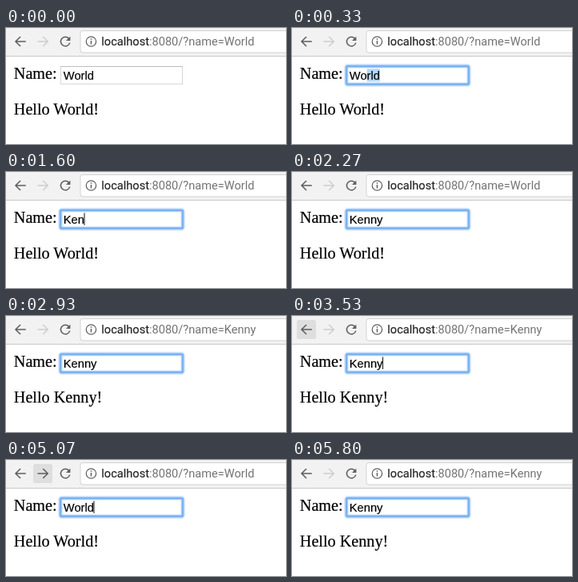
These frames come from a looping animation (350x146 px, 5.94 s). An HTML page:

```html
<!DOCTYPE html>
<html lang="en">
<head>
<meta charset="utf-8">
<title>Name form</title>
<style>
  html, body { margin: 0; width: 100%; height: 100%; overflow: hidden; background: #fff; }
  svg { display: block; width: 100%; height: 100%; }
  text { white-space: pre; }
  .serif { font: 20.2px "Liberation Serif", "Times New Roman", serif; stroke: #000; stroke-width: 0.2; }
  .field { font: 14.7px "Liberation Sans", Arial, sans-serif; stroke: #000; stroke-width: 0.2; }
  .url { font: 14.6px Roboto, sans-serif; fill: #737373; }
  .host { fill: #222; stroke: #222; stroke-width: 0.15; }
  .icon { fill: none; stroke: #5e5e5e; stroke-width: 1.5; }
  .ring { fill: none; }
</style>
</head>
<body>
<svg viewBox="0 0 350 146">
  <rect width="350" height="35" fill="#f2f2f2"/>
  <rect y="35" width="350" height="1" fill="#c8c8c8"/>
  <rect x="93" y="3.5" width="270" height="27.5" rx="3" fill="#fff" stroke="#d2d2d2"/>

  <rect id="backHover" x="6" y="5" width="24" height="24" rx="2.5" fill="#dedede"/>
  <rect id="nextHover" x="34" y="5" width="24" height="24" rx="2.5" fill="#dedede"/>
  <path class="icon" d="M24.8 17H12.5M18 11L12 17L18 23"/>
  <path class="icon" id="next" d="M39.5 17H51.7M46.2 11L52.2 17L46.2 23"/>
  <path class="icon" d="M78.6 13.2A5.8 5.8 0 1 0 79.8 18.6"/>
  <path d="M80.4 10.6V16H75Z" fill="#5e5e5e"/>

  <circle class="icon" cx="106.4" cy="17" r="6.2" style="stroke-width:1.2"/>
  <path d="M105.7 13.3h1.5v1.5h-1.5zM105.7 16h1.5v4.6h-1.5z" fill="#5e5e5e"/>
  <text class="url" x="119.3" y="22"><tspan class="host">localhost</tspan>:8080/?name=<tspan id="query">World</tspan></text>

  <text class="serif" x="9.8" y="64.3">Name:</text>
  <g id="plain" class="ring">
    <rect x="68.5" y="48.5" width="152" height="22" stroke="#d6d6d6"/>
    <path d="M68 48.5H221" stroke="#bdbdbd"/>
  </g>
  <g id="focus" class="ring">
    <rect x="67.9" y="47.9" width="153.2" height="23.2" rx="2" stroke="#7db4f3" stroke-width="5.4" opacity="0.38"/>
    <rect x="68.1" y="48.1" width="152.8" height="22.8" rx="1.5" stroke="#7ab2f3" stroke-width="2.6"/>
  </g>
  <rect id="mark" y="51.5" height="16" fill="#b3d7fe"/>
  <text class="field" id="field" x="71.8" y="64.6">World</text>
  <rect id="caret" y="51.5" width="1.1" height="15.5" fill="#222"/>

  <text class="serif" x="9.8" y="109.3">Hello <tspan id="greet">World</tspan>!</text>
</svg>
<script>
const LOOP = 5940, LEFT = 71.8, NAME = "Kenny", WORLD = "World";
const $ = id => document.getElementById(id);

// Each step changes only the listed properties.
const steps = [
  [0, { url: WORLD, greet: WORLD, field: WORLD, focus: 0, caret: 0, marked: 0, back: 0, next: 0, ahead: 0 }],
  [70, { focus: 1, caret: 1 }],
  [200, { caret: 0, marked: 1 }],
  [270, { marked: 2 }],
  [330, { marked: 3 }],
  [400, { marked: 4 }],
  [470, { marked: 5 }],
  [670, { field: "", marked: 0, caret: 1 }],
  ...[1070, 1330, 1600, 1730, 1800].map((t, i) => [t, { field: NAME.slice(0, i + 1) }]),
  [2270, { caret: 0 }],
  [2330, { url: NAME }],
  [2400, { greet: NAME, caret: 1 }],
  [2800, { caret: 0 }],
  [3330, { caret: 1 }],
  [3470, { back: 0.5 }],
  [3530, { back: 1 }],
  [3800, { caret: 0 }],
  [4000, { url: WORLD, greet: WORLD, field: WORLD, caret: 1, ahead: 1 }],
  [4470, { caret: 0 }],
  [4670, { back: 0.5 }],
  [4730, { back: 0, next: 0.5 }],
  [4800, { next: 1 }],
  [5000, { caret: 1 }],
  [5270, { url: NAME, next: 0, ahead: 0 }],
  [5330, { greet: NAME, field: NAME }],
  [5800, { caret: 0 }]
];

const field = $("field");
const show = (id, value) => $(id).setAttribute("opacity", value);
const width = n => n > 0 ? field.getSubStringLength(0, n) : 0;

function draw(s) {
  $("query").textContent = s.url;
  $("greet").textContent = s.greet;
  field.textContent = s.field;
  show("focus", s.focus);
  show("plain", 1 - s.focus);
  show("caret", s.caret);
  show("backHover", s.back);
  show("nextHover", s.next);
  $("next").style.stroke = s.ahead ? "#5e5e5e" : "#cdcdcd";

  const size = s.field.length, end = width(size);
  $("caret").setAttribute("x", LEFT + end - 0.5);
  const start = width(size - s.marked);
  $("mark").setAttribute("x", LEFT + start);
  $("mark").setAttribute("width", end - start);
}

let last = -1;
function tick() {
  const t = performance.now() % LOOP;
  const count = steps.filter(([at]) => at <= t).length;
  if (count !== last) {
    last = count;
    draw(Object.assign({}, ...steps.slice(0, count).map(step => step[1])));
  }
  requestAnimationFrame(tick);
}
tick();
</script>
</body>
</html>
```
